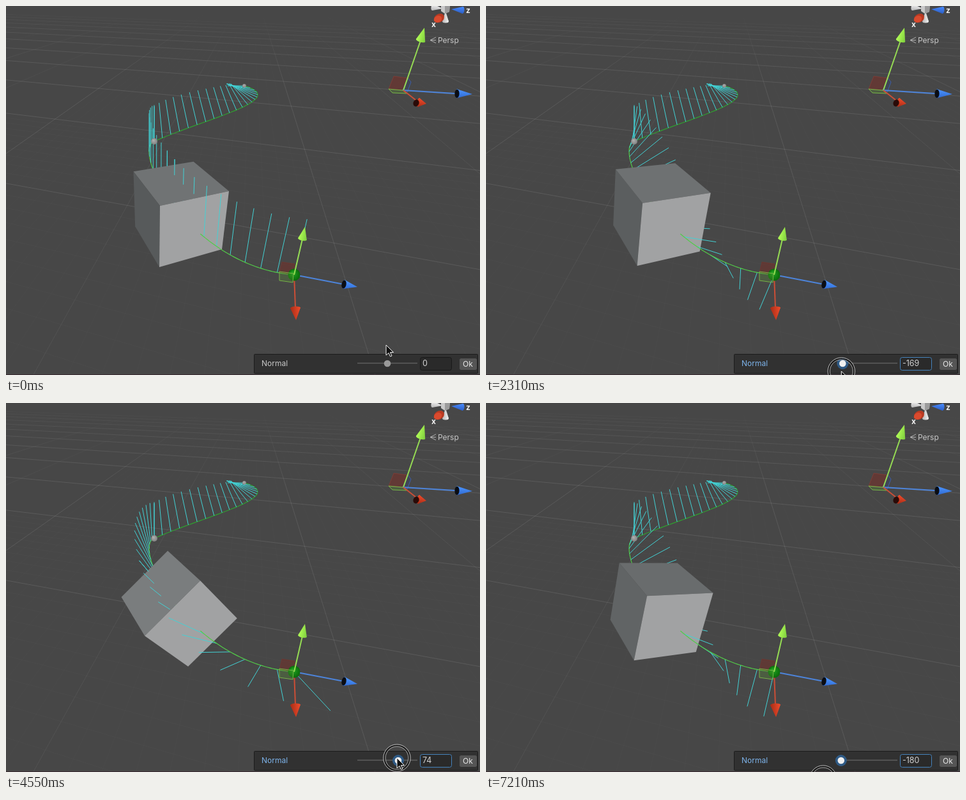
Animation of 742 by 578 pixels, one loop 7.42 s. Source, as an HTML page with a canvas:

```html
<!DOCTYPE html>
<html lang="en">
<head>
<meta charset="utf-8">
<title>Normal slider</title>
<style>
  html, body { margin: 0; width: 100%; height: 100%; overflow: hidden; background: #484848; }
  canvas { display: block; }
</style>
</head>
<body>
<canvas id="stage" width="742" height="578"></canvas>
<script>
const ctx = document.getElementById('stage').getContext('2d');
const LOOP = 7420, STEP = 70, RAD = Math.PI / 180, SEGMENTS = 20;
const CYAN = '#42d2d5', GREEN = '#52cc48';
const { sin, cos, exp, PI } = Math;

// Motion: three drags of the slider, and the hand that follows the knob
const ramp = (t, from, to) => Math.min(1, Math.max(0, (t - from) / (to - from)));

function angleAt(t) {
  const sweep = ramp(t, 2950, 5100);
  return Math.round(-180 * ramp(t, 910, 2373) ** 1.434
    + 360 * (sweep + .0386 * sin(2 * PI * sweep))
    - 360 * ramp(t, 5600, 7000));
}
const knobX = angle => 597 + angle * .229;

function cursorAt(t) {
  const pull = 6 * (ramp(t, 2310, 2520) - ramp(t, 2940, 3080)) + 26 * ramp(t, 6200, 7210);
  return [
    knobX(angleAt(t)) - 2 - pull,
    531 + 32 * ramp(t, 0, 280) + 9 * ramp(t, 1330, 2310) - 9 * ramp(t, 2940, 3500)
      - 7 * ramp(t, 3500, 4550) + 11 * ramp(t, 4550, 6300) + 22 * ramp(t, 6300, 7210)
  ];
}

// Cubic Bezier over homogeneous points [x, y, w]
function bezier(p, t) {
  const u = 1 - t, k = [u * u * u, 3 * u * u * t, 3 * u * t * t, t * t * t];
  const [x, y, w] = [0, 1, 2].map(j => p.reduce((sum, q, i) => sum + q[j] * k[i], 0));
  return [x / w, y / w];
}
const nearPath = [[451, 421, 1], [271.7, 408, 1], [242.3, 278.5, 1.25], [464, 424, 2]];
const farPath = [[232, 212, 1], [315, 175.5, 1], [445, 146.5, 1], [373, 125, 1]];

// Normals as [base, tip]; the near ones turn with the slider, fading out along the path
function nearNormal(t, angle) {
  const [x, y] = bezier(nearPath, t);
  const phi = -angle * (1 - t) * RAD, c = cos(phi), s = sin(phi);
  const up = [18 * exp(-16 * t * t), -66 - 11.5 * cos(PI * t)];
  const side = [92 - 43 * t - 136 * exp(-7.7 * t), -75 * exp(-((t / .31) ** 1.6))];
  const w = 1 + (.07 * t - .11) * c + .145 / (1 + (t / .3) ** 4) * s;
  return [[x, y], [x + (up[0] * c + side[0] * s) / w, y + (up[1] * c + side[1] * s) / w]];
}
function farNormal(t) {
  const [x, y] = bezier(farPath, t);
  const lean = 13 * (1 - exp(-10 * t)) + 36 * exp(-(((t - .8) / .2) ** 2));
  return [[x, y], [x - lean, y - 55 * cos(t * PI / 2)]];
}

// Drawing helpers
function path(pts, close) {
  ctx.beginPath();
  pts.forEach(p => ctx.lineTo(p[0], p[1]));
  if (close) ctx.closePath();
}
function line(pts, color, width = 1) {
  path(pts);
  ctx.strokeStyle = color;
  ctx.lineWidth = width;
  ctx.stroke();
}
function poly(pts, fill, stroke) {
  path(pts, true);
  if (fill) { ctx.fillStyle = fill; ctx.fill(); }
  if (stroke) { ctx.strokeStyle = stroke; ctx.lineWidth = 1; ctx.stroke(); }
}
function oval(x, y, rx, ry, fill, tilt = 0) {
  ctx.beginPath();
  ctx.ellipse(x, y, rx, ry, tilt, 0, 7);
  ctx.fillStyle = fill;
  ctx.fill();
}
function ring(x, y, r, color, width) {
  ctx.beginPath();
  ctx.arc(x, y, r, 0, 7);
  ctx.strokeStyle = color;
  ctx.lineWidth = width;
  ctx.stroke();
}
function box(x, y, w, h, fill, stroke, r = 3) {
  ctx.beginPath();
  ctx.roundRect(x + .5, y + .5, w, h, r);
  ctx.fillStyle = fill;
  ctx.fill();
  ctx.strokeStyle = stroke;
  ctx.lineWidth = 1;
  ctx.stroke();
}
function text(str, x, y, color, font = '12px') {
  ctx.font = font + ' Inter, sans-serif';
  ctx.textBaseline = 'middle';
  ctx.fillStyle = color;
  ctx.fillText(str, x, y);
}
function ball(x, y, r, light, dark) {
  const g = ctx.createRadialGradient(x - r * .3, y - r * .4, 0, x, y, r);
  g.addColorStop(0, light);
  g.addColorStop(1, dark);
  oval(x, y, r, r, g);
}
const mix = (a, b, f) => [a[0] + (b[0] - a[0]) * f, a[1] + (b[1] - a[1]) * f];

// Cone from base centre to apex, shaded across its width
function cone(base, apex, hw, light, dark, rim) {
  const dx = apex[0] - base[0], dy = apex[1] - base[1];
  ctx.save();
  ctx.translate(base[0], base[1]);
  ctx.rotate(Math.atan2(dy, dx));
  const g = ctx.createLinearGradient(0, -hw, 0, hw);
  g.addColorStop(0, light);
  g.addColorStop(1, dark);
  oval(0, 0, 2.5, hw, g);
  poly([[0, -hw], [Math.hypot(dx, dy), 0], [0, hw]], g);
  if (rim) oval(0, 0, 3.6, hw - .4, rim);
  ctx.restore();
}

function grid() {
  ctx.fillStyle = '#474747';
  ctx.fillRect(0, 0, 742, 578);
  const across = (n, alpha) => {
    const y = -30 + 554 / (n + 1.8);
    line([[0, y], [742, y + 742 * (y + 50) / 1800]], `rgba(255,255,255,${alpha})`);
  };
  const along = (m, alpha) => {
    const g = ctx.createLinearGradient(0, 10, 0, 140);
    g.addColorStop(0, 'rgba(255,255,255,0)');
    g.addColorStop(1, `rgba(255,255,255,${alpha})`);
    line([[385, -40], [385 + m * 640, 600]], g);
  };
  for (let n = 0; n < 12; n++) across(n, .1 * Math.min(1, 1.25 - n / 11));
  for (let n = -11; n < 10; n++) if (n % 10) across(n / 10, .018);
  for (let k = -8; k < 9; k++) along(.312 + .866 * k, k % 2 ? .045 : .085);
  for (let k = -20; k < 20; k++) along(.312 + .0866 * k, .012);
}

// Draws the cube, returns whether its upper side can be seen
function cube(rot) {
  const turns = [0, 90, 180, 270].map(q => (q + rot) * RAD);
  const corner = (a, dx, dy, dw) => {
    const c = cos(a), s = sin(a), w = 1 - .0915 * c - .0103 * s + dw;
    return [(293.94 - 75 * c + 51.46 * s + dx) / w, (350.11 - 65.75 * c - 63.11 * s + dy) / w];
  };
  const front = turns.map(a => corner(a, 0, 0, 0));
  const back = turns.map(a => corner(a, -1.2, -1.3, .183));
  let upperSeen = false;
  turns.forEach((turn, k) => {
    const j = (k + 1) % 4, a = front[k], b = front[j], c = back[j];
    const cross = (b[0] - a[0]) * (c[1] - b[1]) - (b[1] - a[1]) * (c[0] - b[0]);
    if (cross >= 0) return;
    if (k === 0) upperSeen = true;
    const v = 49 + 74 * cos(turn + 31 * RAD);
    poly([a, b, c, back[k]], `rgb(${v},${v + 3},${v + 4})`);
  });
  poly(front, '#a1a2a3');
  return upperSeen;
}

function curve(points, from, to, color) {
  const pts = Array.from({ length: 61 }, (_, i) => bezier(points, from + (to - from) * i / 60));
  line(pts, color, 1.2);
}

function ribbon(angle) {
  const steps = Array.from({ length: SEGMENTS + 1 }, (_, i) => i / SEGMENTS);
  const normals = steps.map(t => nearNormal(t, angle));
  const draw = list => list.forEach(n => line(n, CYAN));

  curve(farPath, 0, 1, '#2fa02f');
  draw(steps.map(farNormal));
  curve(nearPath, .31, 1, GREEN);
  draw(normals.slice(7));
  // Inside the cube only the outer third of a normal sticks out
  if (cube(-.555 * angle)) draw(normals.slice(7, 11).map(([b, t]) => [mix(b, t, .66), t]));
  draw(normals.slice(0, 7));
  curve(nearPath, 0, .315, GREEN);
  ball(232, 212, 5, '#b4b4b4', '#828282');
  ball(373, 125, 3, '#b0b0b0', '#868686');
}

const LIME = ['#96dc54', '#b4ff58', '#7ccc3c'], BLUE = ['#4d84da', '#4c96ff', '#2f68d0'], RED = ['#cc4e36', '#f04c2c', '#a82c16'];
const HOLLOW = '#0a0d14';

function arrow(from, base, apex, hw, [shaft, light, dark], rim) {
  line([from, base], shaft, 2);
  cone(base, apex, hw, light, dark, rim);
}

function handles() {
  // Object handle
  const object = [622, 132];
  poly([[607, 110], [629, 113], [621, 132], [599, 130]], 'rgba(130,40,30,.45)', 'rgba(150,60,50,.6)');
  poly([[621, 132], [629, 113], [634, 119], [628, 135]], 'rgba(40,70,150,.2)', '#3d5fa8');
  poly([[599, 130], [621, 132], [627, 137], [605, 136]], 'rgba(90,150,50,.3)', '#79b848');
  arrow(object, [649, 54], [655, 34], 7.5, LIME);
  arrow(object, [706, 137.3], [730, 138], 7, BLUE, HOLLOW);
  arrow(object, [646, 151], [658, 153], 7, RED);
  oval(642, 152, 4.5, 5.5, '#2a0b08', .4);

  // Path point handle
  const point = [451, 421];
  poly([[432, 401], [452, 404], [450, 421], [428, 417]], 'rgba(125,40,30,.45)', 'rgba(130,50,40,.5)');
  line([point, [453, 473]], RED[0], 2);
  line([point, [529, 436]], BLUE[0], 2);
  ball(451, 421, 9.5, '#22a822', '#0a6a0a');
  poly([[428, 416], [450, 419], [449, 433], [428, 430]], 'rgba(90,150,50,.28)', '#78b348');
  arrow(point, [464, 365], [468, 346], 7, LIME);
  cone([529, 436], [550, 440], 7, BLUE[1], BLUE[2], HOLLOW);
  cone([453, 473], [454, 492], 8, RED[1], RED[2]);
}

function viewGizmo() {
  cone([668, 2], [684, 4], 5, '#f4f4f4', '#b8b8b8');
  cone([688, 24], [688, 8], 5, '#b6b6b6', '#f2f2f2');
  oval(678, 19, 8.5, 6.5, '#b83a22', -.5);
  oval(676, 20.5, 6.5, 5, '#d94a2e', -.5);
  poly([[681, -3], [695, -3], [694, 9], [687, 12], [681, 8]], '#c9c9c9');
  poly([[687, 0], [695, -3], [694, 9], [687, 12]], '#9b9b9b');
  cone([715, 6.5], [697, 5], 5.5, '#2c5fc6', '#4a8cff');
  text('z', 720, 7, '#f0f0f0', 'bold 12px');
  text('x', 666, 29, '#f0f0f0', 'bold 12px');
  const grey = '#b4b4b4';
  line([[673, 49], [664, 53.5], [673, 58]], grey);
  line([[664, 53.5], [673, 53.5]], grey);
  text('Persp', 676, 54, '#c6c6c6');
}

function panel(angle, pressed, focused) {
  ctx.fillStyle = '#3a2c33';
  ctx.fillRect(0, 577, 742, 1);
  box(388, 545, 350, 30, '#313131', '#1b1b1b', 1);
  text('Normal', 400, 560.5, pressed ? '#7db3ea' : '#c8c8c8');
  line([[550, 559.5], [644, 559.5]], '#5e5e5e', 1.5);
  const x = knobX(angle);
  if (pressed) oval(x, 560, 9, 9, '#2f5a85');
  oval(x, 560, 5.3, 5.3, pressed ? '#f0f0f0' : '#999');
  box(648, 550, 49, 20, '#2a2a2a', focused ? '#4583bd' : '#191919');
  text(String(angle), 652, 560.5, '#d2d2d2', '12.5px');
  box(709, 551, 28, 19, '#555', '#303030');
  text('Ok', 715, 561, '#eaeaea');
}

function cursor(x, y, pressed) {
  if (pressed) {
    ring(x, y, 19.5, 'rgba(20,20,20,.85)', 3);
    ring(x, y, 21.2, 'rgba(235,235,235,.75)', 1);
    ring(x, y, 18, 'rgba(225,225,225,.7)', 1);
  }
  const shape = [[0, 0], [0, 16], [4, 12.5], [6.5, 18], [9, 17], [6.5, 11.5], [11.5, 11.5]];
  poly(shape.map(p => [x + p[0], y + p[1]]), '#111', '#f4f4f4');
}

function draw(t) {
  const angle = angleAt(t) || 0, pressed = t >= 210;
  grid();
  ribbon(angle);
  handles();
  viewGizmo();
  panel(angle, pressed, t >= 980);
  cursor(...cursorAt(t), pressed);
}

const start = performance.now();
function tick() {
  const t = (performance.now() - start) % LOOP;
  draw(Math.floor(t / STEP) * STEP);
  requestAnimationFrame(tick);
}
tick();
</script>
</body>
</html>
```
